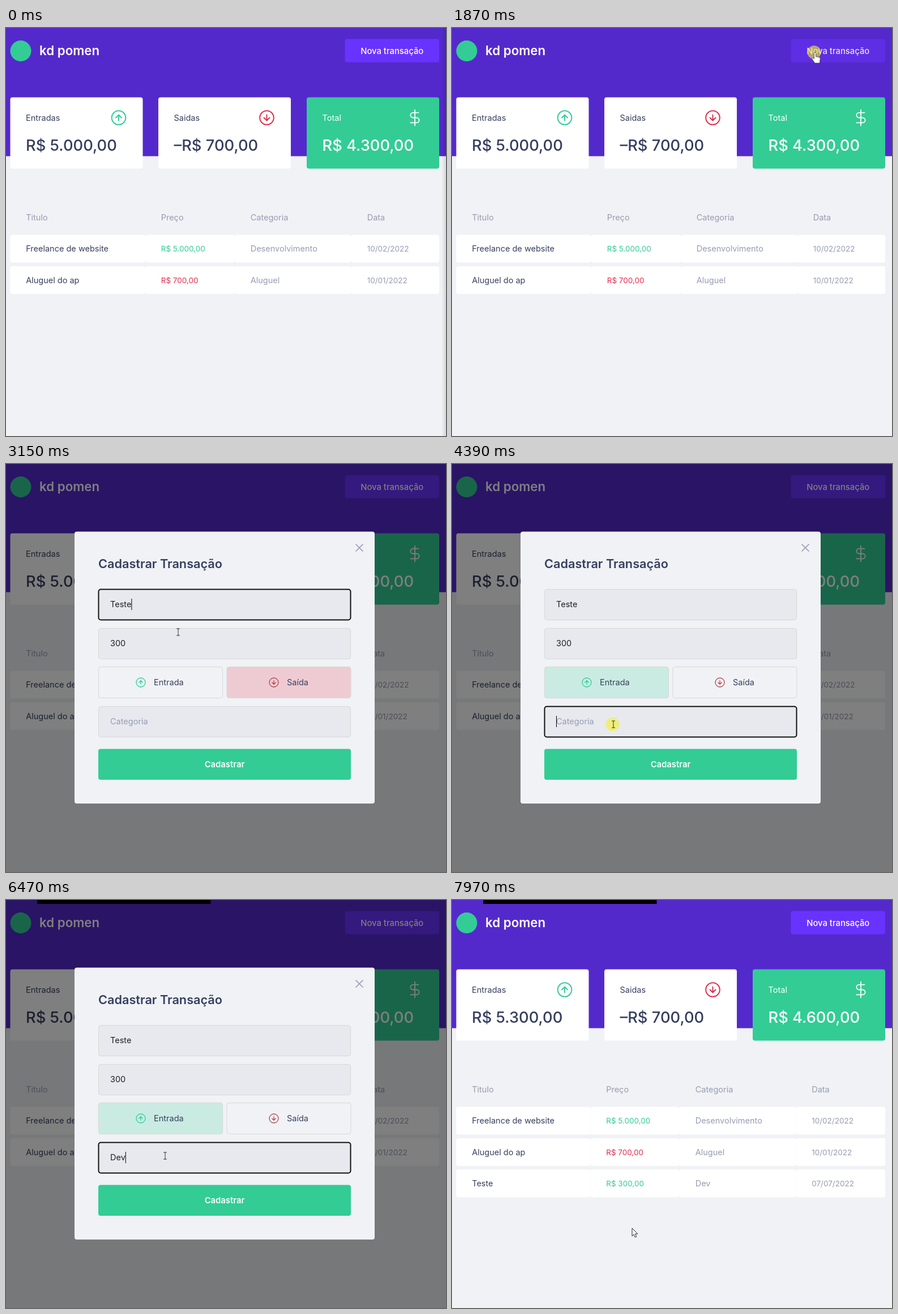
An HTML page for the animation above (8 s loop, 777 px wide and 721 px high).

```html
<!DOCTYPE html>
<html lang="pt-BR">
<head>
<meta charset="utf-8">
<title>Transações</title>
<style>
html, body { margin: 0; width: 100%; height: 100%; overflow: hidden; background: #f0f2f5; }
svg { display: block; width: 777px; height: 721px; font-family: Inter, "Open Sans", sans-serif; }
</style>
</head>
<body>
<svg id="stage" viewBox="0 0 777 721"></svg>
<script>
const LOOP = 8000;
const GREEN = '#33cc95', RED = '#e52e4d', INK = '#363f5f', MUTED = '#969cb2', PAPER = '#f0f2f5';
const WORD = 14.5, NUMBER = 13.5;

// Moments of the story, in ms
const OPEN = 2000, FOCUS_TITLE = 2880, PRESS_INCOME = 3910, PICK_INCOME = 4040,
  FOCUS_CATEGORY = 4390, BAR = 6000, SUBMIT = 7490, CLOSE = 7890;
const TYPED = [[6470, 'Dev'], [6000, 'De'], [5740, 'D']];
const PRESSES = [[1870, 2000], [2880, 2950], [3910, 4040], [4390, 4460], [7490, 7620]];
const POINTER = [
  [320, 425, 690], [1100, 697, 42], [1870, 641, 43], [2000, 641, 43], [2750, 307, 257],
  [3080, 307, 257], [3150, 304, 297], [3910, 282, 404], [4040, 282, 404], [4390, 285, 460],
  [4560, 283, 478], [4730, 281, 452], [6730, 281, 452], [7490, 358, 553], [7620, 358, 553],
  [7820, 341, 563], [7890, 334, 569], [7970, 318, 580]
];

const stage = document.getElementById('stage');
const ruler = document.createElement('canvas').getContext('2d');
const clamp = v => Math.max(0, Math.min(1, v));
const between = (t, [from, to]) => t >= from && t < to;

const rect = (x, y, w, h, fill, more = 'rx="4"') =>
  `<rect x="${x}" y="${y}" width="${w}" height="${h}" fill="${fill}" ${more}/>`;
const text = (x, y, str, fill, size = WORD, more = '') =>
  `<text x="${x}" y="${y}" fill="${fill}" font-size="${size}" ${more}>${str}</text>`;
const line = (d, color, width) =>
  `<path d="${d}" fill="none" stroke="${color}" stroke-width="${width}" stroke-linecap="round" stroke-linejoin="round"/>`;
const at = (x, y, body, more = '') => `<g transform="translate(${x} ${y}) ${more}">${body}</g>`;

function arrowIcon(x, y, color, scale, direction) {
  return at(x, y, `<circle r="12.3" fill="none" stroke="${color}" stroke-width="2"/>` +
    line('M0 5V-5M-5 0L0 -5L5 0', color, 2), `scale(${scale} ${scale * direction})`);
}

function dollarIcon(x, y) {
  return at(x, y, line('M0 -11V11M5 -7H-2.5a3.5 3.5 0 0 0 0 7h5a3.5 3.5 0 0 1 0 7H-6', '#fff', 1.4), 'scale(1.27)');
}

// Buttons darken to 90% over 200 ms while hovered
function button(x, y, w, h, fill, label, baseline, weight, t, [enter, leave]) {
  const hover = clamp((t - enter) / 200) - clamp((t - leave) / 200);
  return rect(x, y, w, h, fill) +
    text(x + w / 2, baseline, label, '#fff', 14.8, `text-anchor="middle" font-weight="${weight}"`) +
    (hover > 0 ? rect(x, y, w, h, '#000', `rx="4" opacity="${0.1 * hover}"`) : '');
}

function card(x, label, value, icon, fill = '#fff', color = INK) {
  return rect(x, 122.5, 234, 126, fill) + text(x + 27.5, 164, label, color) +
    text(x + 27.5, 217, value, color, 27.3, 'font-weight="500"') + icon;
}

function table(done) {
  const edges = done ? [7.5, 244.5, 402, 607.5, 765] : [7.5, 246, 404, 610, 765];
  const columns = edges.slice(0, 4).map(x => x + 27.7);
  const rows = [
    ['Freelance de website', 'R$ 5.000,00', 'Desenvolvimento', '10/02/2022', GREEN],
    ['Aluguel do ap', 'R$ 700,00', 'Aluguel', '10/01/2022', RED]
  ];
  if (done) rows.push(['Teste', 'R$ 300,00', 'Dev', '07/07/2022', GREEN]);
  const head = ['Titulo', 'Preço', 'Categoria', 'Data'].map((s, i) => text(columns[i], 340, s, MUTED));
  const body = rows.map((row, r) => {
    const y = 365.5 + r * 55.4, colors = [INK, row[4], MUTED, MUTED];
    return columns.map((x, i) =>
      rect(edges[i], y, edges[i + 1] - edges[i], 49, '#fff') +
      text(x, y + 29.7, row[i], colors[i], i % 2 ? NUMBER : WORD)).join('');
  });
  return head.concat(body).join('');
}

function page(t) {
  const done = t >= CLOSE;
  return rect(0, 0, 777, 721, PAPER, '') + rect(0, 0, 777, 226.5, '#5429cc', '') +
    `<circle cx="26" cy="40.5" r="18.5" fill="${GREEN}"/>` +
    text(59, 48, 'kd pomen', '#fff', 22.3, 'font-weight="600"') +
    button(598.5, 19.5, 166.5, 41, '#6933ff', 'Nova transação', 45.5, 450, t, [1170, OPEN]) +
    card(7.5, 'Entradas', done ? 'R$ 5.300,00' : 'R$ 5.000,00', arrowIcon(199, 158.5, GREEN, 1, 1)) +
    card(269, 'Saidas', '–R$ 700,00', arrowIcon(460.5, 158.5, RED, 1, -1)) +
    card(531, 'Total', done ? 'R$ 4.600,00' : 'R$ 4.300,00', dollarIcon(722, 158.5), GREEN, '#fff') +
    table(done);
}

function field(y, value, placeholder, focused, caret) {
  let out = rect(163.5, y + 0.5, 445, 54, '#e7e9ee',
    focused ? 'rx="4" stroke="#101010" stroke-width="2"' : 'rx="4" stroke="#d7d7d7"');
  out += text(184, y + 32, value || placeholder, value ? '#202024' : MUTED);
  if (focused && caret) {
    ruler.font = `${WORD}px Inter, "Open Sans", sans-serif`;
    out += rect(184 + ruler.measureText(value).width, y + 17, 1, 20, '#000', '');
  }
  return out;
}

function choice(x, label, color, tint, direction, selected) {
  return rect(x + 0.5, 358.5, 219, 55, selected ? tint : 'none', 'rx="4" stroke="#d7d7d7"') +
    arrowIcon(x + (direction > 0 ? 75 : 83.5), 386, color, 0.65, direction) +
    text(x + (direction > 0 ? 98 : 106.5), 391, label, INK);
}

function modal(t, x, y) {
  const income = t >= PICK_INCOME;
  const category = (TYPED.find(([start]) => t >= start) || [0, ''])[1];
  const caretOn = t < 4930 || t >= 5470;
  const overNumber = t > 3160 && y > 290 && y < 345;
  return rect(0, 0, 777, 721, '#000', 'opacity=".5"') + rect(121, 119.5, 530, 480.5, PAPER) +
    line('M618 142l12 12M630 142l-12 12', MUTED, 1.7) +
    text(163, 184, 'Cadastrar Transação', INK, 21.7, 'font-weight="600"') +
    field(221, 'Teste', '', between(t, [FOCUS_TITLE, PRESS_INCOME]), true) +
    field(290, '300', '', false) +
    (overNumber ? line('M579 314l4 -4l4 4M579 321l4 4l4 -4', '#555', 1.5) : '') +
    choice(163, 'Entrada', GREEN, 'rgba(51,204,149,.2)', 1, income) +
    choice(389.5, 'Saída', '#b5454f', 'rgba(229,46,77,.2)', -1, !income) +
    field(428, category, 'Categoria', between(t, [FOCUS_CATEGORY, SUBMIT]), caretOn) +
    button(163, 503.5, 446, 54.5, GREEN, 'Cadastrar', 536, 600, t, [7190, 7660]);
}

function pointerAt(t) {
  const next = POINTER.findIndex(key => key[0] > t);
  if (next < 0) return POINTER[POINTER.length - 1].slice(1);
  if (next === 0) return [-50, -50];
  const [t0, x0, y0] = POINTER[next - 1], [t1, x1, y1] = POINTER[next];
  const p = (t - t0) / (t1 - t0), ease = p * p * (3 - 2 * p);
  return [x0 + (x1 - x0) * ease, y0 + (y1 - y0) * ease];
}

function pointerShape(t, x, y) {
  const inside = (l, top, r, bottom) => x > l && x < r && y > top && y < bottom;
  if (!between(t, [OPEN, CLOSE])) return inside(599, 20, 765, 60) ? 'hand' : 'arrow';
  if (inside(163, 358, 609, 413) || inside(163, 503, 609, 558)) return 'hand';
  return inside(163, 221, 609, 276) || inside(163, 290, 609, 345) || inside(163, 428, 609, 482) ? 'beam' : 'arrow';
}

const SHAPES = {
  arrow: '<path d="M0 0V14L3.2 11L5.4 16L7.8 15L5.6 10H10Z" fill="#fff" stroke="#222"/>',
  hand: '<path d="M-1.5 1.5a1.5 1.5 0 0 1 3 0v6l6 1.2q2 .6 1.7 2.8l-1 7.5h-8.5l-5-7.5q-.5-1.8 1.5-1.6l2.3 1.6z" fill="#fff" stroke="#333" stroke-width=".7"/>',
  beam: line('M-2.5 -6H2.5M0 -6V6M-2.5 6H2.5', '#333', 1)
};

function pointer(t, x, y) {
  const pressed = PRESSES.some(span => between(t, span));
  return (pressed ? `<circle cx="${x - 1.5}" cy="${y}" r="12" fill="#f5f030" opacity=".6"/>` : '') +
    at(x, y, SHAPES[pointerShape(t, x, y)]);
}

const EDGE_SHADE = '<defs><linearGradient id="edge"><stop stop-opacity="0"/><stop offset="1" stop-opacity=".12"/></linearGradient></defs>' +
  rect(769, 0, 8, 721, 'url(#edge)', '');

function render(now) {
  const t = now % LOOP;
  const [x, y] = pointerAt(t);
  stage.innerHTML = page(t) +
    (t < 1170 ? EDGE_SHADE : '') +
    (between(t, [OPEN, CLOSE]) ? modal(t, x, y) : '') +
    (t >= BAR ? rect(55, 0, 306.5, 7, '#000', '') : '') +
    pointer(t, x, y);
}

const start = performance.now();
function tick() {
  render(performance.now() - start);
  requestAnimationFrame(tick);
}
tick();
</script>
</body>
</html>
```
